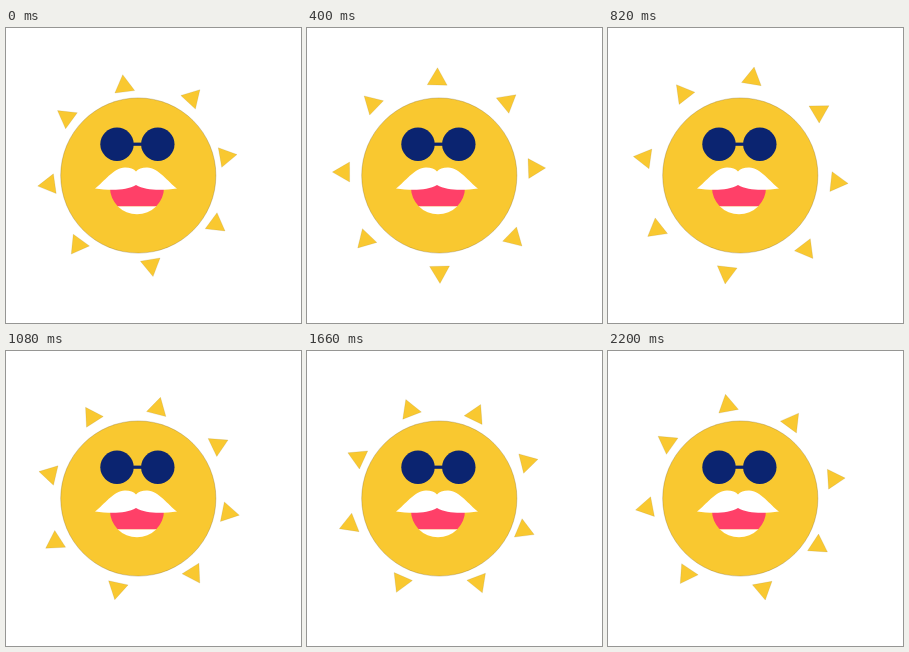
Animation of 295 by 295 pixels, one loop 2220 ms. Source, as an HTML page:

```html
<!DOCTYPE html>
<html lang="en">
<head>
<meta charset="utf-8">
<title>Sun</title>
<style>
  html, body { margin: 0; width: 100%; height: 100%; overflow: hidden; background: #fff; }
  svg { display: block; width: 100vw; height: 100vh; }
</style>
</head>
<body>
<svg viewBox="0 0 295 295">
  <defs>
    <clipPath id="mouth"><path d="M104 159.5a27 26.7 0 0 0 54 0V150H104Z"/></clipPath>
  </defs>
  <g id="rays" fill="#f9c830" stroke="#8a7430" stroke-opacity=".35" stroke-width=".4"></g>
  <circle cx="132.3" cy="147.5" r="77.6" fill="#f9c830" stroke="#6b5a28" stroke-opacity=".55" stroke-width=".5"/>
  <g fill="#0b2470">
    <circle cx="111" cy="116.2" r="16.7"/>
    <circle cx="151.8" cy="116.2" r="16.7"/>
    <rect x="126" y="114.6" width="11" height="3.2"/>
  </g>
  <g clip-path="url(#mouth)">
    <rect x="100" y="150" width="62" height="28.4" fill="#ff4068"/>
    <rect x="100" y="178.4" width="62" height="10" fill="#fff"/>
  </g>
  <path fill="#fff" d="M89 160.5C98 154 107 140 119 139.5C124 139.5 128 141 130 143.5C132 141 136 139.5 141 139.5C153 140 162 154 171 160.5C157 162.5 140 163 130 157C120 163 103 162.5 89 160.5Z"/>
</svg>
<script>
  const LOOP = 2220, STEP = 20, PULSE = 560;
  const CX = 132, CY = 147, SIZE = 11.5;

  // angle around the sun, extra distance, extra tilt (degrees, px, degrees)
  const rays = [
    [0, 0, 2], [44, 4, 8], [87, -0.4, 2], [131.2, 2, 4],
    [180.6, 1.2, -1], [229.6, 2, -5], [272.8, -0.6, -2], [317.9, 1.6, -3]
  ];

  const group = document.getElementById("rays");
  const side = SIZE * Math.sqrt(3) / 2;
  const shapes = rays.map(() => {
    const p = document.createElementNS("http://www.w3.org/2000/svg", "path");
    p.setAttribute("d", `M0 ${-SIZE}L${side} ${SIZE / 2}L${-side} ${SIZE / 2}Z`);
    return group.appendChild(p);
  });

  function draw(ms) {
    const t = Math.floor((ms % LOOP) / STEP) * STEP;
    const turn = -8.9 + 0.0197 * t;
    const reach = 90 + 7.4 * Math.abs(Math.sin(Math.PI * t / PULSE));
    rays.forEach(([angle, extra, tilt], i) => {
      shapes[i].setAttribute("transform",
        `translate(${CX} ${CY}) rotate(${turn + angle}) translate(0 ${-reach - extra}) rotate(${tilt})`);
    });
  }

  const start = performance.now();
  function tick(now) {
    draw(Math.max(0, now - start));
    requestAnimationFrame(tick);
  }
  draw(0);
  requestAnimationFrame(tick);
</script>
</body>
</html>
```
